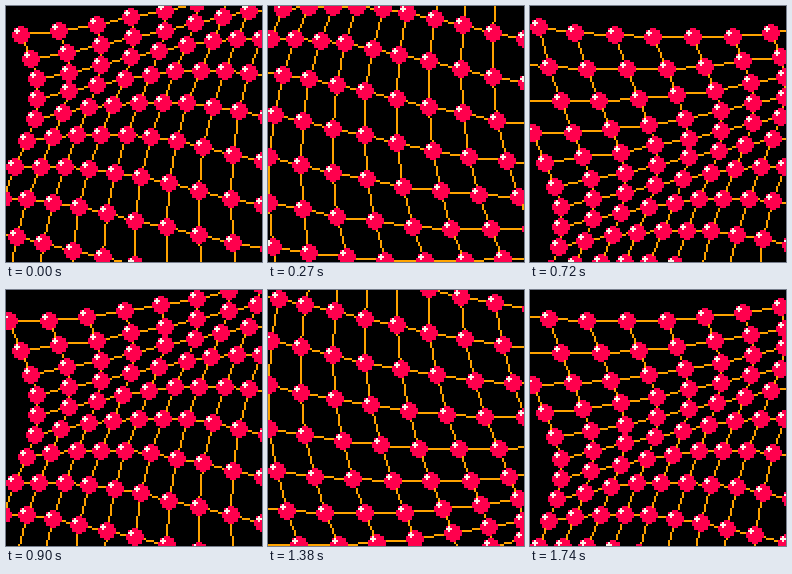
These frames come from a looping animation (256x256 px, 1.77 s). An HTML page with a canvas:

```html
<!DOCTYPE html>
<html>
<head>
<meta charset="utf-8">
<style>
html, body { margin: 0; width: 100%; height: 100%; overflow: hidden; background: #000; }
canvas { display: block; width: 100vw; height: 100vh; image-rendering: pixelated; }
</style>
</head>
<body>
<canvas width="128" height="128"></canvas>
<script>
const ctx = document.querySelector('canvas').getContext('2d');
const STEP_MS = 30, STEPS = 59, COUNT = 11, CELL = 16, RADIUS = 16;
const BALL = [4, 4, 3, 3, 1]; // half width of each row, from the centre outwards
const SPARK = [1, 0];

// Each knot circles its grid position; the phase runs diagonally across the net.
function knot(i, j, step) {
  const angle = 2 * Math.PI * (0.1731 - i * 3 / 80 - j / 16 - step * 0.94 / 30);
  return [
    Math.floor(i * CELL + RADIUS * Math.cos(angle)),
    Math.floor(j * CELL + RADIUS * Math.sin(angle))
  ];
}

function line([x0, y0], [x1, y1]) {
  const n = Math.max(Math.abs(x1 - x0), Math.abs(y1 - y0));
  for (let k = 0; k <= n; k++) {
    ctx.fillRect(Math.round(x0 + (x1 - x0) * k / n), Math.round(y0 + (y1 - y0) * k / n), 1, 1);
  }
}

function disc(x, y, rows, color) {
  ctx.fillStyle = color;
  rows.forEach((w, dy) => {
    ctx.fillRect(x - w, y - dy, 2 * w + 1, 1);
    ctx.fillRect(x - w, y + dy, 2 * w + 1, 1);
  });
}

function draw(step) {
  ctx.fillStyle = '#000';
  ctx.fillRect(0, 0, 128, 128);
  const net = Array.from({ length: COUNT }, (_, j) =>
    Array.from({ length: COUNT }, (_, i) => knot(i, j, step)));

  ctx.fillStyle = '#ffa300';
  net.forEach((row, j) => row.forEach((p, i) => {
    if (i + 1 < COUNT) line(p, row[i + 1]);
    if (j + 1 < COUNT) line(p, net[j + 1][i]);
  }));

  for (const [x, y] of net.flat()) {
    disc(x, y, BALL, '#ff004d');
    disc(x - 2, y - 2, SPARK, '#fff1e8');
  }
}

const start = performance.now();
function tick() {
  draw(Math.floor((performance.now() - start) / STEP_MS) % STEPS);
  requestAnimationFrame(tick);
}
tick();
</script>
</body>
</html>
```
